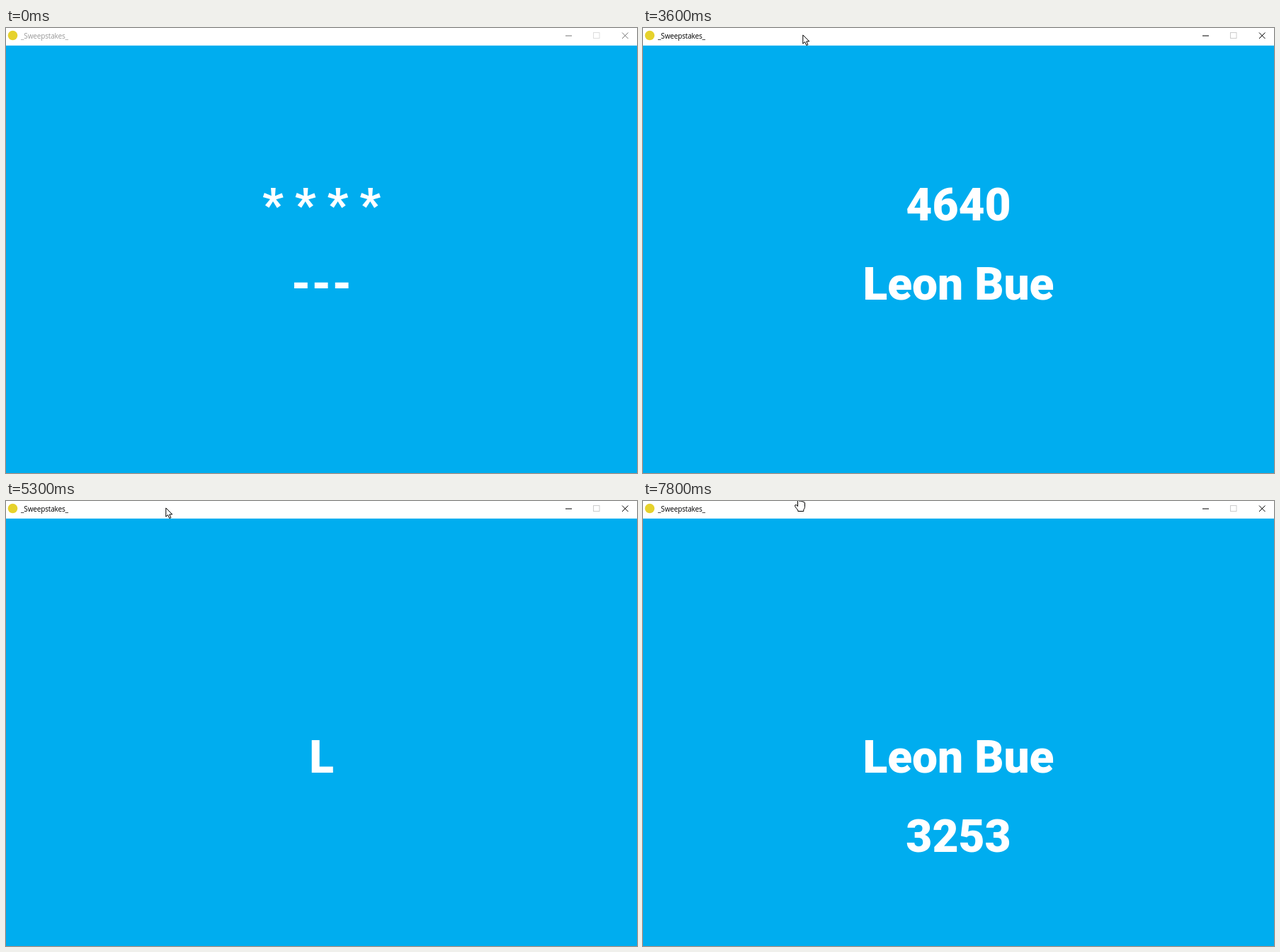
An HTML page with a canvas that plays this animation: 891x629 px, repeating every 8 s.

```html
<!DOCTYPE html>
<html lang="en">
<head>
<meta charset="utf-8">
<title>Sweepstakes</title>
<style>
  html, body { margin: 0; width: 100%; height: 100%; overflow: hidden; background: #00adef; }
  canvas { display: block; }
</style>
</head>
<body>
<canvas id="stage" width="891" height="629"></canvas>
<script>
const ctx = document.getElementById('stage').getContext('2d');
const LOOP = 8000, TICK = 100;
const ENTER = 700, RETURN = 1200, FOCUS = 1400, SHUFFLE = 2700, TYPING = 5300, HAND = 7800;
const PEOPLE = ['Leon Bue', 'Lena Bue'];
const TICKETS = [1668, 2907, 3074, 1496, 4640, 3253];

const ARROW = new Path2D('M.8 .9V13.2L3.6 10.6L5.9 15.5L7.9 14.6L5.8 9.9H9.8Z');
const POINTER = new Path2D('M4.5 7.5V-4H7V.5Q8.5 -.6 9.6 .6Q11 .2 12 1.2Q14.3 1 14.5 3' +
  'V8.5Q14.3 10.5 12.8 12.2V14.5H4.8V13Q2.5 10.5 .7 7.6Q0 5.5 2 5.4Q3.5 6 4.5 7.5Z');

const ticks = (t, start) => Math.floor((t - start) / TICK);

// Four-step move that slows down towards its end
function glide(t, start, [x0, y0], [x1, y1]) {
  const left = 1 - Math.min(1, ticks(t, start) / 3);
  const ease = 1 - left * left;
  return [x0 + (x1 - x0) * ease, y0 + (y1 - y0) * ease].map(Math.round);
}

function titleBar(active) {
  ctx.fillStyle = '#fff';
  ctx.fillRect(0, 0, 891, 24.8);

  ctx.fillStyle = '#e6d22c';
  ctx.beginPath();
  ctx.arc(9.5, 10.5, 6.8, 0, 7);
  ctx.fill();

  ctx.fillStyle = active ? '#000' : '#999';
  ctx.font = '10px "Open Sans", sans-serif';
  ctx.letterSpacing = '-0.15px';
  ctx.textAlign = 'left';
  ctx.fillText('_Sweepstakes_', 21, 15);
  ctx.letterSpacing = '0px';

  ctx.lineWidth = 1;
  ctx.strokeStyle = active ? '#000' : '#777';
  ctx.stroke(new Path2D('M790 11H799M870 6.5L878.5 15M878.5 6.5L870 15'));
  ctx.strokeStyle = active ? '#ccc' : '#ddd';
  ctx.strokeRect(829.5, 6.5, 8.5, 8);
}

function message(...rows) {
  ctx.fillStyle = '#fff';
  ctx.font = '900 64px Roboto, sans-serif';
  ctx.textAlign = 'center';
  rows.forEach((text, i) => ctx.fillText(text, 445.5, 272 + 112 * i));
}

function draw(t) {
  if (t < SHUFFLE) {
    message('* * * *', '---');
  } else if (t < TYPING) {
    const turn = Math.min(10, Math.floor((ticks(t, SHUFFLE) + .45) / 2.3));
    message(TICKETS[turn % TICKETS.length], PEOPLE[turn % 2]);
  } else {
    const winner = PEOPLE[0], typed = ticks(t, TYPING) + 1;
    message('', winner.slice(0, typed), typed > winner.length ? TICKETS.at(-1) : '');
  }
}

function cursor(t) {
  if (t < ENTER) return;
  const hand = t >= HAND;
  const [x, y] = hand ? [214, 0]
    : t < RETURN ? glide(t, ENTER, [168, -9], [214, 4])
    : glide(t, RETURN, [219, 7], [225, 9]);
  const shape = hand ? POINTER : ARROW;
  ctx.save();
  ctx.translate(x, y);
  ctx.fillStyle = '#fff';
  ctx.strokeStyle = '#000';
  ctx.fill(shape);
  ctx.stroke(shape);
  ctx.restore();
}

function render(now) {
  const t = now % LOOP;
  ctx.fillStyle = '#00adef';
  ctx.fillRect(0, 0, 891, 629);
  titleBar(t >= FOCUS);
  draw(t);
  cursor(t);
  requestAnimationFrame(render);
}
render(performance.now());
</script>
</body>
</html>
```
